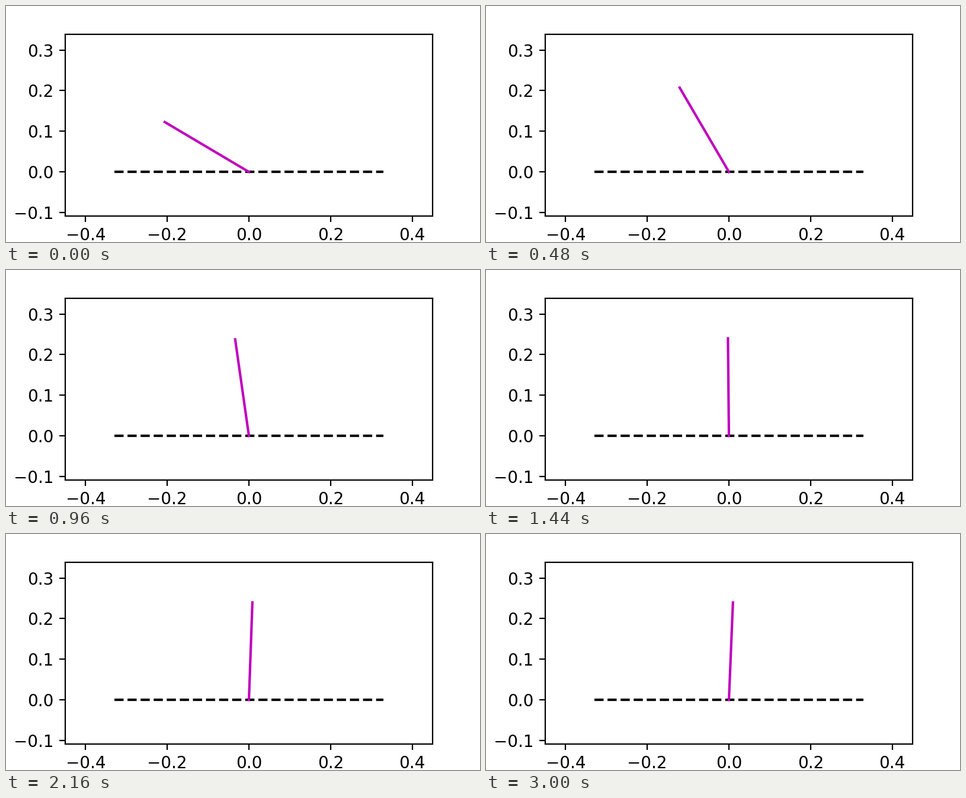
Write a matplotlib script that moves like this. It is 800 px wide and 400 px high and loops after 3.06 s.

```python
import numpy as np
import matplotlib.pyplot as plt
from matplotlib.animation import FuncAnimation

FRAMES, INTERVAL = 51, 60
ROD = 0.24
SWING, REST, RATE = 62.4, -2.7, 0.196  # degrees, degrees, per step


def lean(n):
    """Lean to the left of vertical, in degrees."""
    settle = SWING * (1 + RATE * n) * np.exp(-RATE * n)  # critically damped
    sway = 0.5 * np.sin(np.pi * (n**2 - 552) / 880)  # slow, quickening
    return REST + settle + sway


fig = plt.figure(figsize=(4, 2), dpi=200)
ax = fig.add_subplot()
ax.set_xlim(-0.45, 0.45)
half = 0.45 * 308 / 620  # equal scale on both axes
ax.set_ylim(0.115 - half, 0.115 + half)

ax.plot([-0.33, 0.33], [0, 0], "k--", lw=1.5)
rod, = ax.plot([], [], "m-", lw=1.5)


def update(n):
    a = np.radians(lean(n))
    rod.set_data([0, -ROD * np.sin(a)], [0, ROD * np.cos(a)])
    return rod,


anim = FuncAnimation(fig, update, frames=FRAMES, interval=INTERVAL,
                     repeat=True, repeat_delay=0)
plt.show()
```
